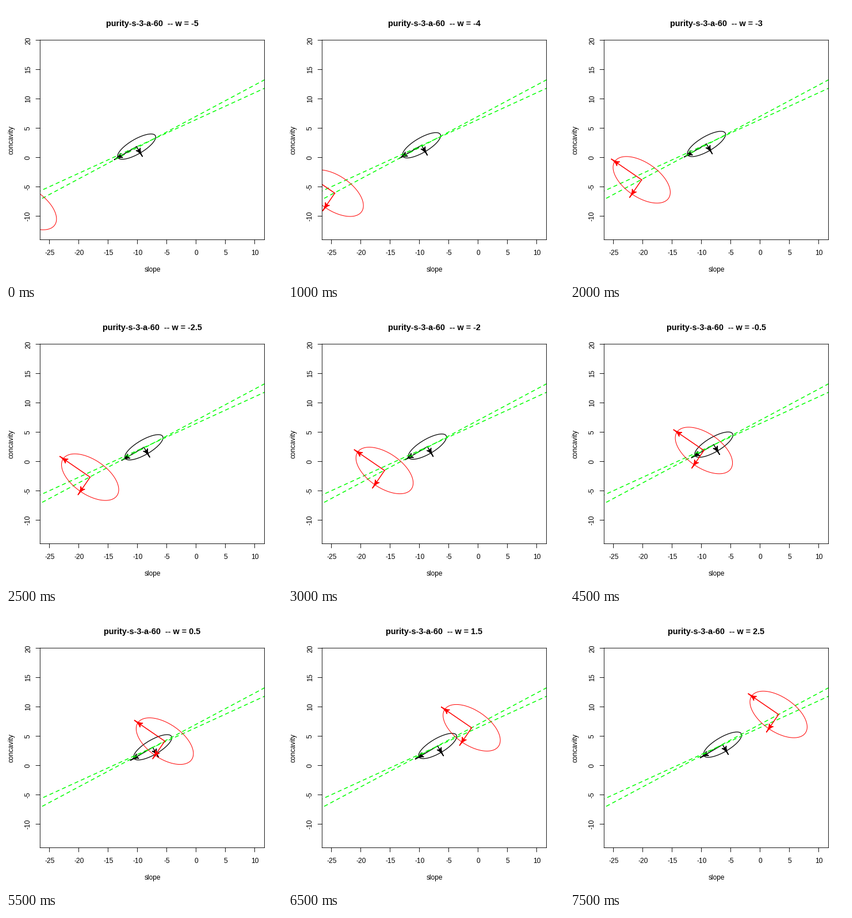
Write a matplotlib script that moves like this. It is 480 px wide and 480 px high and loops after 8 s.

```python
import matplotlib.pyplot as plt
import numpy as np
from matplotlib.animation import FuncAnimation
from matplotlib.patches import Polygon, Rectangle

SIZE, DPI = 480, 72  # at 72 dpi one point is one pixel
LEFT, TOP, RIGHT, BOTTOM = 59.04, 59.04, 449.76, 406.56
STEPS, INTERVAL = 16, 500
GREEN = "#00ff00"

plt.rcParams["font.family"] = ["Liberation Sans", "DejaVu Sans"]
plt.rcParams["axes.unicode_minus"] = False

fig = plt.figure(figsize=(SIZE / DPI, SIZE / DPI), dpi=DPI, facecolor="white")
ax = fig.add_axes([0, 0, 1, 1])
ax.set_xlim(0, SIZE)
ax.set_ylim(SIZE, 0)
ax.axis("off")

clip = Rectangle((LEFT, TOP), RIGHT - LEFT, BOTTOM - TOP, fc="none", ec="none")
ax.add_patch(clip)


def px(v):
    return 330.6 + 10.186 * v


def py(v):
    return 263.5 - 10.186 * v


def rule(x0, y0, x1, y1):
    ax.plot([x0, x1], [y0, y1], color="black", lw=0.9, snap=False,
            solid_capstyle="projecting", zorder=6)


def label(x, y, text, size=12, **kw):
    return ax.text(x, y, text, fontsize=size, ha="center", va="baseline", **kw)


def side_label(x, y, text):
    ax.text(x, y, text, fontsize=12, rotation=90, rotation_mode="anchor",
            ha="center", va="baseline")


def draw_frame():
    l, t, r, b = 59.3, 59.3, 449.6, 406.5
    for edge in ((l, t, r, t), (r, t, r, b), (l, b, r, b), (l, t, l, b)):
        rule(*edge)
    for v in range(-25, 11, 5):
        x = np.floor(px(v)) + 0.5
        rule(x, b, x, b + 7.2)
        label(px(v), 433, str(v))
    for v in range(-10, 21, 5):
        y = np.floor(py(v)) + 0.5
        rule(l, y, l - 7.2, y)
        side_label(42, py(v), str(v))
    label(254.4, 462, "slope")
    side_label(13, 232.8, "concavity")


def head_shape():
    """Curved arrowhead pointing along +x with its middle at the origin."""
    unit, rad = 11.34, 0.7
    a = np.linspace(1.75 * np.pi, 1.5 * np.pi, 12)
    x, y = -rad * np.cos(a), rad + rad * np.sin(a)
    c = np.linspace(np.pi / 2, 3 * np.pi / 2, 20)
    xs = np.concatenate([x, x[::-1], x[0] - y[0] * 0.25 * np.cos(c)])
    ys = np.concatenate([y, -y[::-1], -y[0] * np.sin(c)])
    xs = xs * 2.6 * unit
    return np.column_stack([xs - xs.min() / 2, ys * 3.45 * unit / 2])


HEAD = head_shape()


class Blob:
    """Ellipse with an arrow along each of its two axes."""

    def __init__(self, color, width, origin, speed, major, radii, z):
        self.origin, self.speed = np.array(origin), np.array(speed)
        u = np.array(major) / np.hypot(*major)
        v = np.array([-u[1], u[0]])
        if v[1] < 0:
            v = -v
        self.axes = [(u, radii[0]), (v, radii[1])]
        t = np.linspace(0, 2 * np.pi, 181)[:, None]
        self.oval = radii[0] * np.cos(t) * u + radii[1] * np.sin(t) * v
        self.ring, = ax.plot([], [], color=color, lw=width, zorder=z)
        self.shafts, self.heads = [], []
        for _ in self.axes:
            shaft, = ax.plot([], [], color=color, lw=1.5, zorder=z)
            head = Polygon(HEAD, closed=True, fc=color, ec=color, lw=1.5,
                           joinstyle="round", zorder=z)
            ax.add_patch(head)
            self.shafts.append(shaft)
            self.heads.append(head)
        for artist in [self.ring, *self.shafts, *self.heads]:
            artist.set_clip_path(clip)

    def move(self, w):
        c = self.origin + self.speed * w
        self.ring.set_data(*(c + self.oval).T)
        for (d, r), shaft, head in zip(self.axes, self.shafts, self.heads):
            end = c + d * r
            shaft.set_data([c[0], end[0]], [c[1], end[1]])
            turn = np.array([[d[0], d[1]], [-d[1], d[0]]])
            head.set_xy(end + HEAD @ turn)


def track(x0, y_left, y_right):
    """Dashed path across the plot, with a dash starting at x0."""
    slope = (y_right - y_left) / (RIGHT - LEFT)
    start = x0 - 24 / np.hypot(1, slope)
    xs = np.array([start, RIGHT + 20])
    line, = ax.plot(xs, y_left + slope * (xs - LEFT), color=GREEN, lw=1.5,
                    dashes=(4, 4), dash_capstyle="round", zorder=3)
    line.set_clip_path(clip)


draw_frame()
track(65.2, 321.8, 143.0)
track(63.4, 336.6, 128.3)
black = Blob("black", 1.25, (252.6, 233.0), (5.09, -2.31),
             (-38.7, 22.7), (37.75, 12.7), 2)
red = Blob("red", 1.0, (254.5, 232.7), (43.28, -23.2),
           (-52.8, -36.2), (56.7, 30.0), 4)
title = label(254.4, 35, "", 14.4, weight="bold")


def update(i):
    w = -5 + 0.5 * i
    title.set_text(f"purity-s-3-a-60  -- w = {w:g}")
    black.move(w)
    red.move(w)
    return []


anim = FuncAnimation(fig, update, frames=STEPS, interval=INTERVAL,
                     repeat=True, repeat_delay=0, blit=False)
plt.show()
```
